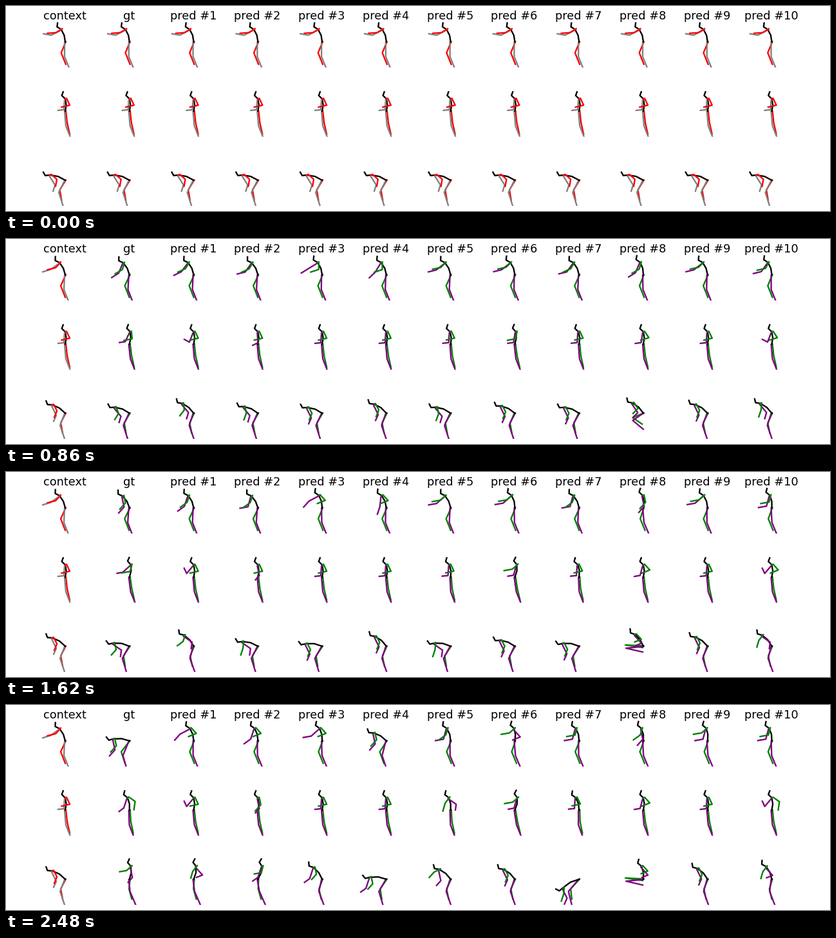
A matplotlib script that plays this animation: 1280 px wide and 320 px high, repeating every 2.5 s.

```python
import numpy as np
import matplotlib.pyplot as plt
from matplotlib.animation import FuncAnimation
from matplotlib.patches import Rectangle

W, H = 1280, 320
FRAMES, SEEN = 125, 25            # the first SEEN frames are observed
SETTLE, MID, END = 18, 81, 124
COLS, STEP = 12, 99.78
NAMES = ["context", "gt"] + [f"pred #{i}" for i in range(1, 11)]

# Arm poses: upper arm and forearm, degrees forward from straight down.
REACH, TRAY, DIP = (48, 80), (15, 80), (18, 54)
DRAPE, DROP, HANG = (62, 42), (38, 16), (6, 18)
BEND, FOLD = (-12, 42), (-42, 68)
BACK, CURL = (-55, 8), (40, 155)
KEEP = None

# Each row: first and settled pose (lean, left arm, right arm), lengths of
# neck and arms, and the settled knee and ankle measured from the hip.
ROWS = [
    dict(first=(-18, (62, 100), (59, 86)), rest=(-25, (55, 73), (42, 76)),
         neck=21, arms=((16, 12.5), (12, 13)),
         left=[(-2, 23), (5, 41)], right=[(-7, 17), (0, 35)]),
    dict(first=(0, (4, 84), (-25, 77)), rest=(0, (4, 84), (-25, 77)),
         neck=19, arms=((15.5, 9), (12, 13)),
         left=[(1, 23), (8, 41)], right=[(3, 18), (7, 36)]),
    dict(first=(-71, (-32, 17), (-48, 10)), rest=(-57, (-26, 24), (-27, 22)),
         neck=24, arms=((16.5, 10), (11.5, 11)),
         left=[(-8, 19), (-1, 40)], right=[(-7, 15), (-4, 31)]),
]
SQUAT = dict(left=[(-27, 3), (-1, 9)], right=[(-28, -2), (-1, 2)])
# How far knee and ankle follow each degree of lean.
SWAY = dict(left=(0.14, 0.17), right=(0.10, 0.12))

goals = {}


def vector(pose, before=None, squat=0):
    """Flatten a pose; kept arms come from the pose before."""
    lean, left, right = pose
    left = before[1:3] if left is KEEP else left
    right = before[3:5] if right is KEEP else right
    return np.array([lean, *left, *right, squat], float)


def act(row, col, mid, end, squat=0):
    a = vector(mid, vector(ROWS[row]["rest"]), squat)
    goals[row, col] = a, vector(end, a, squat)


act(0, 1, (-30, BEND, BEND), (-83, BEND, BEND))
act(0, 2, (-24, DIP, DIP), (-17, DRAPE, FOLD))
act(0, 3, (-29, TRAY, DIP), (-15, DIP, FOLD))
act(0, 4, (-15, DRAPE, FOLD), (-12, REACH, FOLD))
act(0, 5, (-21, HANG, FOLD), (-58, BEND, BEND))
act(0, 6, (-25, REACH, REACH), (-17, TRAY, DIP))
act(0, 7, (-15, REACH, REACH), (-4, FOLD, REACH))
act(0, 8, (-25, TRAY, DIP), (-15, TRAY, TRAY))
act(0, 9, (-3, BEND, BEND), (-9, BEND, DIP))
act(0, 10, (-18, REACH, REACH), (-6, TRAY, REACH))
act(0, 11, (-9, TRAY, TRAY), (-12, TRAY, TRAY))

act(1, 1, (6, REACH, TRAY), (-9, DIP, BACK))
act(1, 2, (0, CURL, KEEP), (0, CURL, KEEP))
act(1, 3, (0, BEND, KEEP), (0, BEND, BEND))
act(1, 6, (-6, KEEP, KEEP), (-9, BACK, DROP))
act(1, 7, (9, TRAY, REACH), (11, TRAY, REACH))
act(1, 8, (-6, KEEP, KEEP), (-15, KEEP, KEEP))
act(1, 9, (0, TRAY, FOLD), (0, TRAY, FOLD))
act(1, 11, (0, CURL, FOLD), (0, CURL, BACK))

act(2, 1, (-79, BACK, BEND), (6, BEND, REACH))
act(2, 2, (-41, BACK, DIP), (10, FOLD, DROP))
act(2, 3, (-73, BACK, HANG), (17, DIP, TRAY))
act(2, 4, (-81, KEEP, KEEP), (-36, DIP, BEND))
act(2, 5, (-49, KEEP, KEEP), (-83, DIP, BEND))
act(2, 6, (-79, BACK, HANG), (-49, BEND, DRAPE))
act(2, 7, (-68, KEEP, KEEP), (-49, KEEP, KEEP))
act(2, 8, (-80, KEEP, KEEP), (-118, KEEP, HANG))
act(2, 9, (-35, FOLD, FOLD), (-8, FOLD, FOLD), squat=1)
act(2, 10, (-53, KEEP, KEEP), (-43, KEEP, KEEP))
act(2, 11, (-41, BACK, DROP), (-24, FOLD, DROP))


def ease_out(f, start, stop):
    return np.sin(np.pi / 2 * np.clip((f - start) / (stop - start), 0, 1))


def pose_at(row, col, f):
    first, rest = vector(ROWS[row]["first"]), vector(ROWS[row]["rest"])
    pose = first + (rest - first) * min(f / SETTLE, 1)
    if f >= SEEN and (row, col) in goals:
        mid, end = goals[row, col]
        pose = rest + (mid - rest) * ease_out(f, SEEN, MID)
        pose += (end - mid) * ease_out(f, MID, END)
    return pose


def polar(deg, r):
    """Offset at an angle clockwise from straight up."""
    a = np.radians(deg)
    return np.array([r * np.sin(a), -r * np.cos(a)])


def spine(lean, length):
    """Hip to head, with the neck and head tilting along with the back."""
    neck = polar(lean, length)
    mid = neck / 2 + 0.08 * np.array([-neck[1], neck[0]])
    nose = neck + polar(0.72 * lean - 45, 7.5)
    return [np.zeros(2), mid, neck, nose, nose + polar(0.7 * lean + 20, 6)]


def arm(neck, shift, angles, lengths):
    shoulder = neck + np.array(shift)
    elbow = shoulder + polar(180 + angles[0], lengths[0])
    return [neck, shoulder, elbow, elbow + polar(180 + angles[1], lengths[1])]


def leg(side, shift, row, turn, squat):
    joints = np.array(row[side], float)
    joints[:, 0] += np.array(SWAY[side]) * turn
    joints += (np.array(SQUAT[side]) - joints) * squat
    return [(0, 0), shift, *joints]


def skeleton(r, pose):
    row = ROWS[r]
    lean, squat = pose[0], pose[5]
    rest = row["rest"][0]
    back = spine(lean, row["neck"] + 0.07 * (abs(lean) - abs(rest)))
    neck = back[2]
    return [
        leg("right", (1, -0.5), row, lean - rest, squat),
        leg("left", (-1, 0.5), row, lean - rest, squat),
        back,
        arm(neck, (-1, 1.5), pose[1:3], row["arms"][0]),
        arm(neck, (2, -1), pose[3:5], row["arms"][1]),
    ]


fig = plt.figure(figsize=(16, 4), dpi=80, facecolor="white")
ax = fig.add_axes([0, 0, 1, 1])
ax.set(xlim=(0, W), ylim=(H, 0))
ax.axis("off")

for i, name in enumerate(NAMES):
    ax.text(91.2 + STEP * i, 20.6, name, size=16, ha="center", va="baseline",
            family="DejaVu Sans")

people = []
for row in range(3):
    window = Rectangle((0, 108 * row), W, 96.3, transform=ax.transData)
    for col in range(COLS):
        lines = [ax.plot([], [], color="black", lw=2.1,
                         solid_joinstyle="round")[0] for _ in range(5)]
        for line in lines:
            line.set_clip_path(window)
        people.append((row, col, lines))


def draw(f):
    for row, col, lines in people:
        hip = np.array([92 + STEP * col, 56 + 108 * row])
        seen = f < SEEN or col == 0
        left, right = ("gray", "red") if seen else ("purple", "green")
        colors = (right, left, "black", left, right)
        bones = skeleton(row, pose_at(row, col, f))
        for line, joints, color in zip(lines, bones, colors):
            line.set_data(*(np.array(joints) + hip).T)
            line.set_color(color)
    return [line for *_, lines in people for line in lines]


anim = FuncAnimation(fig, draw, frames=FRAMES, interval=20, repeat=True,
                     repeat_delay=0, blit=False)
plt.show()
```
